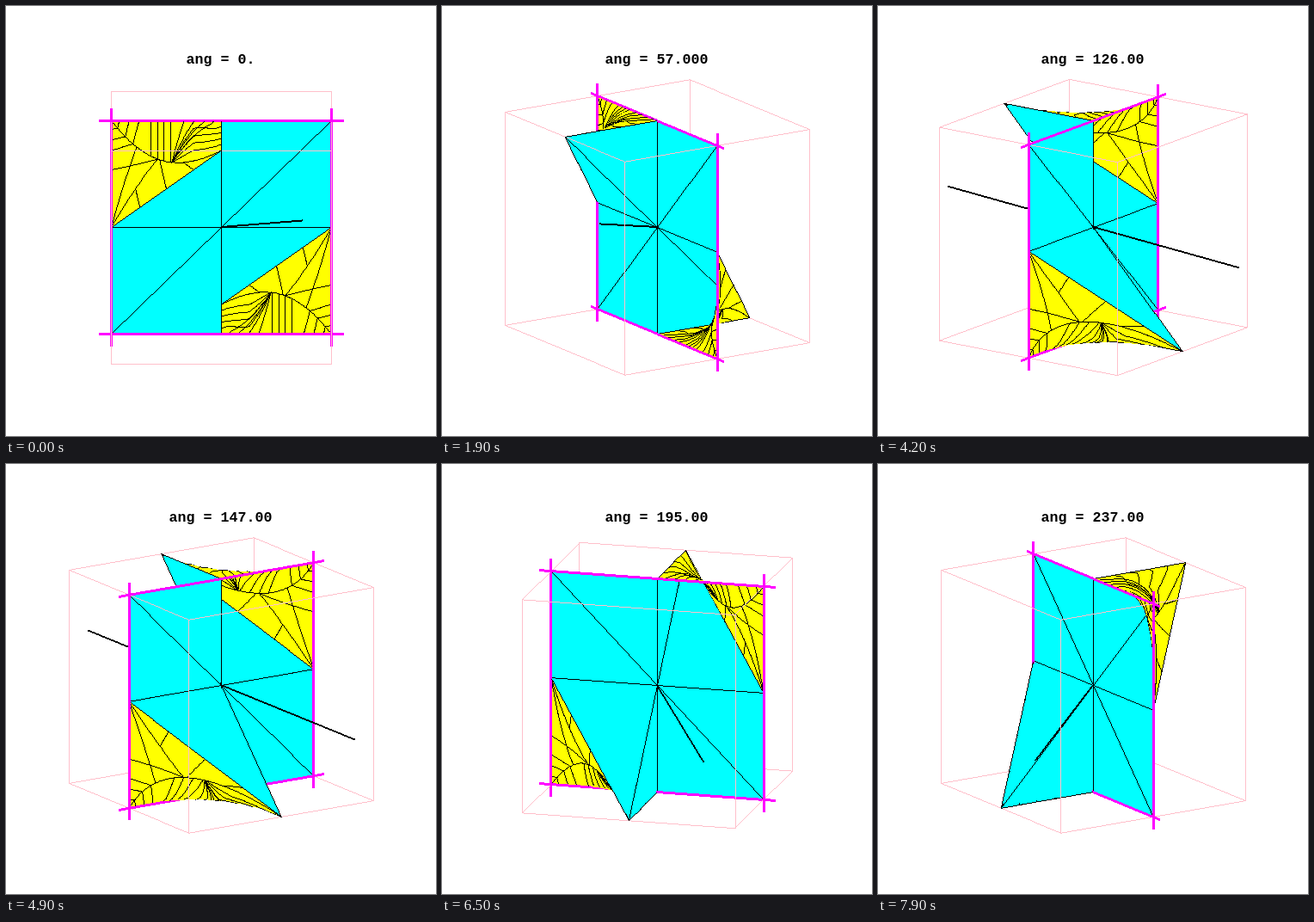
Write an HTML page with a canvas that moves like this. It is 500 px wide and 500 px high and loops after 8 s.

```html
<!DOCTYPE html>
<html lang="en">
<head>
<meta charset="utf-8">
<title>Rotating surface</title>
<style>
  html, body { margin: 0; width: 100%; height: 100%; overflow: hidden; background: #fff; }
  canvas { position: absolute; left: 0; top: 0; display: block; }
  #label {
    position: absolute; left: 0; top: 53px; width: 499px; text-align: center;
    font: bold 16.67px/20px "Liberation Mono", monospace; color: #000; white-space: pre;
  }
</style>
</head>
<body>
<canvas id="view" width="500" height="500"></canvas>
<div id="label"></div>
<script>
const SIZE = 500, STEP_MS = 100, STEPS = 80, DEG_PER_STEP = 3;
// Pixels per unit: across, up, and downwards for nearer points
const ACROSS = 128, RISE = 124, SINK = 34.5;
// Packed as ABGR
const WHITE = 0xffffffff, BLACK = 0xff000000, PINK = 0xffcbc0ff;
const CYAN = 0xffffff00, YELLOW = 0xff00ffff, MAGENTA = 0xffff00ff;

const ctx = document.getElementById("view").getContext("2d");
const label = document.getElementById("label");
const image = ctx.createImageData(SIZE, SIZE);
const pixels = new Uint32Array(image.data.buffer);
const depths = new Float32Array(SIZE * SIZE);

const faces = [];
const lines = [];
const flip = p => p.map(n => -n);
const mix = (a, b, k) => a.map((n, i) => n + (b[i] - n) * k);
const spread = (from, to, count) =>
  Array.from({ length: count }, (_, i) => from + (to - from) * i / (count - 1));

function addLine(a, b, color, width, bias) {
  lines.push({ a, b, color, width, bias });
}

// Edges and faces come in pairs mirrored through the centre
function addEdge(a, b) {
  addLine(a, b, BLACK, 1, 0.025);
  addLine(flip(a), flip(b), BLACK, 1, 0.025);
}

function addFace(points, color) {
  faces.push({ points, color }, { points: points.map(flip), color });
}

// Saddle patch on the corners (-1,1,0) (0,1,0) (0,1,1) (-1,0,0)
function patch([u, v]) {
  const bulge = u * u * Math.sqrt(Math.max(0, (1 - u) * v)) * (1 - v);
  const y = 1 - (1 - u) * v + bulge * SINK / RISE;
  return [u - 1, Math.min(1, y), u * v + bulge];
}

// Draws a path of (u, v) points along the patch
function addPath(...stops) {
  const parts = 5;
  for (let i = 1; i < stops.length; i++) {
    const at = k => patch(mix(stops[i - 1], stops[i], k / parts));
    for (let k = 0; k < parts; k++) addEdge(at(k), at(k + 1));
  }
}

function buildBox() {
  for (const i of [-1, 1]) for (const j of [-1, 1]) {
    addLine([-1, i, j], [1, i, j], PINK, 1, 0);
    addLine([i, -1, j], [i, 1, j], PINK, 1, 0);
    addLine([i, j, -1], [i, j, 1], PINK, 1, 0);
  }
}

function buildFan() {
  const center = [0, 0, 0];
  const rim = [[-1, 0, 0], [0, 1, 1], [0, 1, 0], [1, 1, 0], [1, 0, 0]];
  for (let i = 0; i < 4; i++) {
    addFace([center, rim[i], rim[i + 1]], CYAN);
    addEdge(center, rim[i]);
    addEdge(rim[i], rim[i + 1]);
  }
}

function buildPatch() {
  const n = 16;
  for (let i = 0; i < n; i++) for (let j = 0; j < n; j++) {
    const at = (di, dj) => patch([(i + di) / n, (j + dj) / n]);
    addFace([at(0, 0), at(1, 0), at(1, 1)], YELLOW);
    addFace([at(0, 0), at(1, 1), at(0, 1)], YELLOW);
  }
}

function buildMesh() {
  const top = t => [t, 0], left = t => [0, t], right = t => [1, t], bottom = t => [t, 1];
  const ridge = t => [t, t + 0.1 * Math.sin(Math.PI * t)];
  const hub = ridge(0.42), knot = ridge(0.55), elbow = [0.22, 0.76];

  addPath(...spread(0, 1, 7).map(ridge));
  // Loops around the flat corner
  for (const t of spread(0.08, 0.28, 3)) addPath(left(t), ridge(t * 0.7), top(t * 0.9));
  addPath(left(0.46), hub);
  // Upright rungs, then two fans meeting at the knot
  for (const t of spread(0.36, 0.54, 4)) addPath(top(t), ridge(t));
  for (const t of spread(0.66, 0.94, 4)) addPath(top(t), mix(top(t), knot, 0.55), knot);
  for (const t of spread(0.2, 0.8, 4)) addPath(right(t), [0.75, t * 0.75], knot);
  // Strip along the slanted edge
  for (const t of spread(0.5, 0.75, 2)) addPath(bottom(t), ridge(t * 0.88));
  addPath(bottom(0), ridge(0.23));
  addPath(bottom(0), elbow, hub);
  addPath(bottom(0.26), elbow);
}

function buildFrame() {
  const end = 1.11;
  for (const s of [-1, 1]) {
    addLine([-end, s, 0], [end, s, 0], MAGENTA, 3, 0.04);
    addLine([s, -end, 0], [s, end, 0], MAGENTA, 3, 0.04);
  }
  const normal = [2, 1, 3].map(n => n * 0.366);
  addLine(flip(normal), normal, BLACK, 2, 0.005);
}

function projector(angle) {
  const c = Math.cos(angle), s = Math.sin(angle);
  return ([x, y, z]) => {
    const near = x * s + z * c;
    return [
      250 + ACROSS * (x * c - z * s),
      257 + SINK * near - RISE * y,
      (RISE * near + SINK * y) / ACROSS
    ];
  };
}

function plot(x, y, depth, color) {
  if (x < 0 || y < 0 || x >= SIZE || y >= SIZE) return;
  const i = y * SIZE + x;
  if (depth >= depths[i]) {
    depths[i] = depth;
    pixels[i] = color;
  }
}

function fillTriangle([a, b, c], color) {
  const area = (b[0] - a[0]) * (c[1] - a[1]) - (b[1] - a[1]) * (c[0] - a[0]);
  if (Math.abs(area) < 1e-6) return;
  const xs = [a[0], b[0], c[0]], ys = [a[1], b[1], c[1]];
  const right = Math.floor(Math.max(...xs)), bottom = Math.floor(Math.max(...ys));
  for (let y = Math.ceil(Math.min(...ys)); y <= bottom; y++) {
    for (let x = Math.ceil(Math.min(...xs)); x <= right; x++) {
      const p = ((x - a[0]) * (c[1] - a[1]) - (y - a[1]) * (c[0] - a[0])) / area;
      const q = ((b[0] - a[0]) * (y - a[1]) - (b[1] - a[1]) * (x - a[0])) / area;
      if (p < -1e-6 || q < -1e-6 || p + q > 1 + 1e-6) continue;
      plot(x, y, a[2] + p * (b[2] - a[2]) + q * (c[2] - a[2]), color);
    }
  }
}

function strokeLine(a, b, { color, width, bias }) {
  const dx = b[0] - a[0], dy = b[1] - a[1];
  const flat = Math.abs(dx) >= Math.abs(dy);
  const count = Math.max(1, Math.ceil(Math.max(Math.abs(dx), Math.abs(dy))));
  const first = -Math.floor(width / 2);
  for (let i = 0; i <= count; i++) {
    const [px, py, pz] = mix(a, b, i / count);
    const x = Math.round(px), y = Math.round(py);
    for (let o = first; o < first + width; o++) {
      plot(flat ? x : x + o, flat ? y + o : y, pz + bias, color);
    }
  }
}

function draw(step) {
  const degrees = step * DEG_PER_STEP;
  const project = projector(degrees * Math.PI / 180);
  pixels.fill(WHITE);
  depths.fill(-9);
  for (const face of faces) fillTriangle(face.points.map(project), face.color);
  for (const line of lines) strokeLine(project(line.a), project(line.b), line);
  ctx.putImageData(image, 0, 0);
  label.textContent = "ang = " + (degrees ? degrees.toPrecision(5) : "0.");
}

buildBox();
buildFan();
buildPatch();
buildMesh();
buildFrame();

const start = performance.now();
let shown = -1;
function tick() {
  const step = Math.floor((performance.now() - start) / STEP_MS) % STEPS;
  if (step !== shown) draw(shown = step);
  requestAnimationFrame(tick);
}
tick();
</script>
</body>
</html>
```
